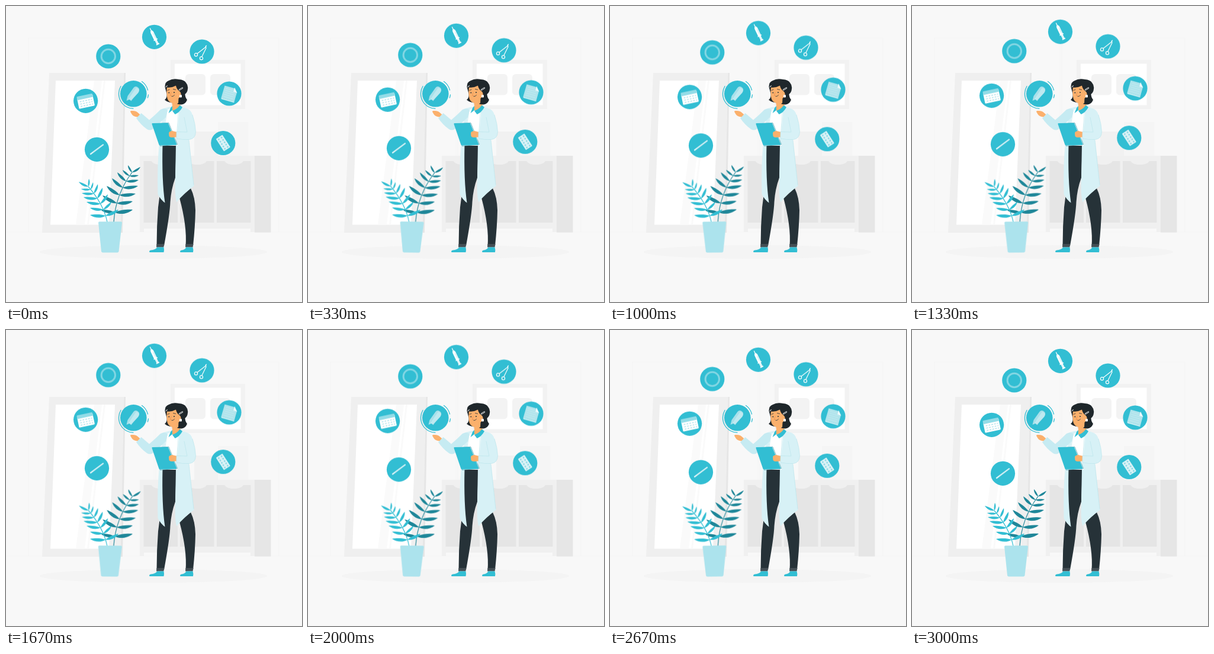
Write an HTML page that moves like this. It is 500 px wide and 500 px high and loops after 3040 ms.

```html
<!DOCTYPE html>
<html lang="en">
<head>
<meta charset="utf-8">
<title>Health care illustration</title>
<style>
  html, body { margin: 0; width: 100%; height: 100%; overflow: hidden; background: #f8f8f8; }
  svg { display: block; width: 100vw; height: 100vh; }
  .float { animation: float 3040ms linear infinite; }
  .sway { transform-origin: 175px 343px; animation: sway 3040ms linear infinite; }
  @keyframes float {
    0%, 98.684%, 100% { transform: translateY(0); }
    49.342% { transform: translateY(-10px); }
  }
  /* two swings of 1.5 s, then a short rest */
  @keyframes sway {
    0%, 49.342%, 98.684%, 100% { transform: rotate(0); }
    12.336%, 61.678% { transform: rotate(1deg); }
    37.007%, 86.349% { transform: rotate(-1deg); }
  }
  .teal { fill: #32bed3; }
  .skin { fill: #fbb06c; }
  .coat { fill: #d7f1f6; }
  .dark { fill: #263238; }
  .hair { fill: #1f272b; }
  .line { fill: none; stroke-linecap: round; stroke-linejoin: round; }
</style>
</head>
<body>
<svg viewBox="0 0 500 500">
  <!-- wall and floor -->
  <path d="M38 381V54H250V381M253 381V54H461V381M0 381.500H500" fill="none" stroke="#f4f4f4" stroke-width=".7"/>

  <!-- mirror -->
  <path d="M199 113H202L197 383H193Z" fill="#e6e6e6"/>
  <path d="M73 113H199.500L193.500 383H61Z" fill="#efefef"/>
  <path d="M84 126H184L174 369.500H75Z" fill="#fff"/>
  <path d="M149 126H162L133 369.500H118ZM165 126H168L140 369.500H137Z" fill="#fafafa"/>

  <!-- wall picture -->
  <path d="M278 91H404V174H278Z" fill="#f2f2f2"/>
  <path d="M285 97.500H396.500V167.500H285Z" fill="#fff"/>
  <g fill="#f3f3f3">
    <rect x="303" y="115" width="34" height="35.500" rx="6"/>
    <rect x="345" y="115" width="34" height="35.500" rx="6"/>
  </g>

  <!-- cabinet -->
  <path d="M358 196H409.500V253H358Z" fill="#f5f5f5"/>
  <path d="M318 212H358V253H318Z" fill="#f1f1f1"/>
  <path d="M226 253H420V376H233V382H226Z" fill="#f0f0f0"/>
  <path d="M413 253H420V382H413Z" fill="#f0f0f0"/>
  <path d="M420 253H447.500V382.500H420Z" fill="#e6e6e6"/>
  <g id="doors" fill="#e5e5e5"></g>

  <ellipse cx="249" cy="415.500" rx="192" ry="11.500" fill="#f4f4f4"/>

  <!-- plant -->
  <g class="sway">
    <g id="plants"></g>
    <path d="M156 366Q156 364.300 158 364.300H194Q196 364.300 196 366L190.500 414.500Q190 416.500 188 416.500H163.500Q161.500 416.500 161 414.500Z" fill="#ace3ed"/>
  </g>

  <!-- legs -->
  <path class="dark" d="M262 234H288L286 290Q279 309 277.500 331Q277 350 267 405H254.500Q254.500 372 257 340Q259 322 262 306Z"/>
  <path class="dark" d="M293 324L312 308Q319.500 323 320 345Q319.500 372 316 405H303.500Q306 372 293 324Z"/>
  <path d="M254.500 402H267.300L266.300 407.500H254ZM303.500 402H316.500L315.500 407.500H303Z" fill="#444e54"/>
  <path class="teal" d="M255.500 407.500H266.500Q267.500 412 266.500 416H242.500Q241 413.500 244.500 412.500Q252 412 255.500 407.500ZM304.500 407.500H315.500Q317 412 316 416H294.500Q293 413.500 296.500 412.500Q302 412 304.500 407.500Z"/>

  <!-- coat and shirt -->
  <path class="coat" d="M264 174Q276 169 282 171H296Q310 172 314 181L309 226L317.500 304Q302 315 288 331.500Q284.500 317 286 290L287 234H264.500Q263 295 268.500 332.500Q261 327 256.500 318Q255 272 259 230L263 205Z"/>
  <path d="M272 176L281 171L293 182L290 236H266Q266 203 272 176Z" fill="#fff"/>
  <path class="coat" d="M293 174L287 234H308L312 186Z"/>
  <path class="line" d="M291 181L287 236M272 177L269 198M309 227L317 302" stroke="#b5e2ea" stroke-width=".6"/>

  <!-- pointing arm -->
  <path class="skin" d="M225 188L219 187Q214 186 212 182L210 178.500Q210 176.500 212.500 177Q219 176.500 222 179.500L226 183Z"/>
  <path d="M220 189.500L228.500 181L242 192.500Q251 185 261 175Q269 171 273 176L270 188Q260 197 248 208Q243 211 238 208Q228 201 220 189.500Z" fill="#c6ebf2"/>

  <!-- neck and collar -->
  <path class="skin" d="M280 159L293 157L295 170Q288 180 280 176Q279 172 281 169Z"/>
  <path class="teal" d="M293.500 167.500L298 171Q293 180 285.500 183L281 177Q289 174.500 293.500 167.500ZM281 169L278 172L274.500 181L281 176Z"/>

  <!-- head -->
  <path class="hair" d="M268.500 137Q268 128.500 275 126Q282 122 292 124Q301 124.500 304 129.500Q308 134 307 140Q306.500 146 302.500 149Q302.500 154 306 158.500Q303 166 296.500 166.500Q290 166.500 285 163Q275 164.500 268 158.500Q272.500 155 271.500 148Z"/>
  <path class="skin" d="M272 137.500Q280 138.500 287 134.500Q288 140 292.500 143.500Q296 146 295.500 150Q294 154 291.500 156L291 164Q287 166.500 281 164Q274.500 162.500 272.500 156Q270.500 147 272 137.500Z"/>
  <path class="line" d="M293 141.500L298 138.500" stroke="#fff" stroke-width="2.200"/>
  <path class="line" d="M293 141.500L298 138.500" stroke="#1f272b" stroke-width=".9"/>
  <path class="line" d="M270 137Q270 135 272.500 134.800" stroke="#fff" stroke-width="1"/>
  <rect x="293" y="150" width="4" height="4.500" rx="1.200" fill="#fff"/>
  <g class="dark"><circle cx="275.300" cy="146.500" r="1"/><circle cx="284" cy="146" r="1"/></g>
  <path class="line" d="M272.800 142.500L276 141.200M282.500 140.500L286.500 141.500M280 152.800Q283 153 284.500 150.500" stroke="#263238" stroke-width=".8"/>
  <path class="line" d="M279 146L277.500 151.500L279.500 151.500" stroke="#e88f4c" stroke-width=".7"/>

  <!-- clipboard and holding arm -->
  <path d="M247.500 199L275 197.500L289.500 234L260.500 236.500Z" fill="#f7fdfe" stroke="#1f8799" stroke-width=".6"/>
  <path class="teal" d="M246.500 199.500Q246 198 247.500 198L272.500 197.500Q274 197.500 274.500 199L288 232.500Q288.500 234.500 287 234.700L260.500 235.500Q259 235.500 258.300 234Z"/>
  <path class="skin" d="M289 213L281 211Q275 211.500 275 215L275.500 220Q277 222.500 281 222L289 221.500Z"/>
  <path class="coat" d="M299 173Q311 173 315 184Q320 199 320.500 213Q320 224 310 225.500Q298 226 287.500 224L288 212.500L304 213Q300 198 298 186Z"/>
  <path class="line" d="M301 188L306 213L288 212.500V224Q298 226 310 225.500Q320 224 320.500 213Q320 199 315 184" stroke="#b5e2ea" stroke-width=".6"/>

  <!-- selected item -->
  <circle class="teal" cx="215.300" cy="148.300" r="22.300"/>
  <path class="line" d="M215 173.300A25 25 0 0 1 194 135.500M229.500 127.500A25 25 0 0 1 239.500 142M240.500 150A25 25 0 0 1 239.300 155" stroke="#32bed3" stroke-width="1.300"/>
  <path d="M203.500 160L205.500 152L215.500 138Q219 134 224 138.500Q226.500 142 223.500 146.500L214 157L211.500 160.500L208.500 158Z" fill="#a8e0ea"/>
  <path d="M207 157L220 138L224 140Q225.500 143 223 146.500L213.500 157L211 159Z" fill="#bfe9f0"/>

  <!-- floating items -->
  <g class="float">
    <g transform="translate(172.800 85)">
      <circle class="teal" r="20.600"/>
      <circle r="11.700" fill="none" stroke="#82d6e3" stroke-width="3"/>
    </g>
    <g transform="translate(250.500 52.300)">
      <circle class="teal" r="20.600"/>
      <g transform="rotate(-26)">
        <path class="line" d="M0-16V-10" stroke="#fff" stroke-width="1.300"/>
        <path d="M-1.300-12H1.300L2.600-9V5H-2.600V-9ZM-3.600 4.500H3.600V6H-3.600ZM-1.800 6H1.800V13H-1.800ZM-2.800 12.800H2.800V14.300H-2.800Z" fill="#fff"/>
        <path d="M1-7V3M0 7.500V12" stroke="#a5dfe9" stroke-width=".7"/>
      </g>
    </g>
    <g transform="translate(331 77)">
      <circle class="teal" r="20.600"/>
      <g class="line" stroke="#fff" stroke-width="1.200">
        <circle cx="-10" cy="5.200" r="2.600"/>
        <circle cx="-1" cy="11.300" r="2.600"/>
        <path d="M-8 3.400L5.500-7L7.500-10M-.2 8.800L7-6L6.300-9.500"/>
      </g>
    </g>
    <g transform="translate(134.600 160.300)">
      <circle class="teal" r="20.600"/>
      <g transform="rotate(-12)">
        <rect x="-13.500" y="-9" width="27" height="20" rx="1.500" fill="#fff"/>
        <path d="M-13.500-4V-8.500Q-13.500-10-12-10H12Q13.500-10 13.500-8.500V-4Z" fill="#93dce7"/>
        <path d="M-10-.5H11M-10 3.500H11M-10 7.500H11" stroke="#b5e5ed" stroke-width="1.600" stroke-dasharray="2.800 2"/>
      </g>
    </g>
    <g transform="translate(153.500 242.300)">
      <circle class="teal" r="20.600"/>
      <path class="line" d="M-10.500 7.700L10.500-7.900" stroke="#d9f2f6" stroke-width="2.300"/>
      <path class="line" d="M-6 4.700L10-7.100" stroke="#a9e1ea" stroke-width=".6"/>
    </g>
    <g transform="translate(377 148)">
      <circle class="teal" r="20.600"/>
      <g transform="rotate(16)">
        <path d="M-11-11H6L12-5V11H-11Z" fill="#b0e4ec"/>
        <path d="M6-12.500L12.500-5H6Z" fill="#effafc"/>
        <path d="M-8-7H4M-8-3.500H9M-8 0H9M-8 3.500H9M-8 7H9" stroke="#c6ebf2" stroke-width=".8"/>
        <path d="M-11 11H12V12.500H-10Z" fill="#dff5f8"/>
      </g>
    </g>
    <g transform="translate(366.800 231.500)">
      <circle class="teal" r="20.600"/>
      <g transform="rotate(57)">
        <rect x="-12.500" y="-6.500" width="25" height="13" rx="1.200" fill="#d9f2f6"/>
        <path class="line" d="M-9.200-2.800H10M-9.200 2.800H10" stroke="#8fd9e5" stroke-width="2.800" stroke-dasharray=".1 4.600"/>
      </g>
    </g>
  </g>
</svg>
<script>
  const path = (parent, attrs) => {
    const el = document.createElementNS('http://www.w3.org/2000/svg', 'path');
    for (const key in attrs) el.setAttribute(key, attrs[key]);
    document.getElementById(parent).append(el);
  };

  for (const x of [232.5, 294, 356]) {
    path('doors', { d: `M${x} 262H${x + 13}Q${x + 17} 268 ${x + 29} 268T${x + 45} 262H${x + 57.5}V366H${x}Z` });
  }

  const onCurve = ([a, b, c], t) =>
    [0, 1].map(k => (1 - t) ** 2 * a[k] + 2 * t * (1 - t) * b[k] + t * t * c[k]);

  // A leaf runs from its stem to its tip, fuller on the lower side.
  function leaf([x, y], [tx, ty], side, fill) {
    const dx = tx - x, dy = ty - y;
    const bend = (along, out) =>
      `${x + dx * along - dy * out * side} ${y + dy * along + dx * out * side}`;
    path('plants', {
      d: `M${x} ${y}C${bend(.25, -.2)} ${bend(.7, -.2)} ${tx} ${ty}C${bend(.75, .06)} ${bend(.3, .1)} ${x} ${y}`,
      fill
    });
  }

  // Tips are listed from the pot upwards; leaves crowd towards the top.
  function plant(stem, left, right, color) {
    const [a, b, c] = stem;
    path('plants', { d: `M${a}Q${b} ${c}`, fill: 'none', stroke: color, 'stroke-width': 1.2 });
    left.forEach((tip, i) => {
      const base = onCurve(stem, 1 - .82 * (1 - i / 6) ** 1.3);
      leaf(base, tip, 1, color);
      leaf(base, right[i], -1, color);
    });
  }

  plant([[182, 365], [185, 318], [213, 281]],
    [[160, 344], [163, 320], [170, 304], [179, 291], [188, 281], [197, 277], [206, 269]],
    [[214, 344], [214, 330], [219, 317], [223, 304], [224, 294], [224, 286], [227, 272]],
    '#1f8799');
  plant([[171, 365], [165, 335], [139, 305]],
    [[142, 353], [142, 341], [136, 331], [131, 323], [128, 316], [127, 309], [123, 297]],
    [[190, 344], [178, 331], [172, 318], [163, 307], [155, 301], [147, 298], [140, 292]],
    '#32bed3');
</script>
</body>
</html>
```
